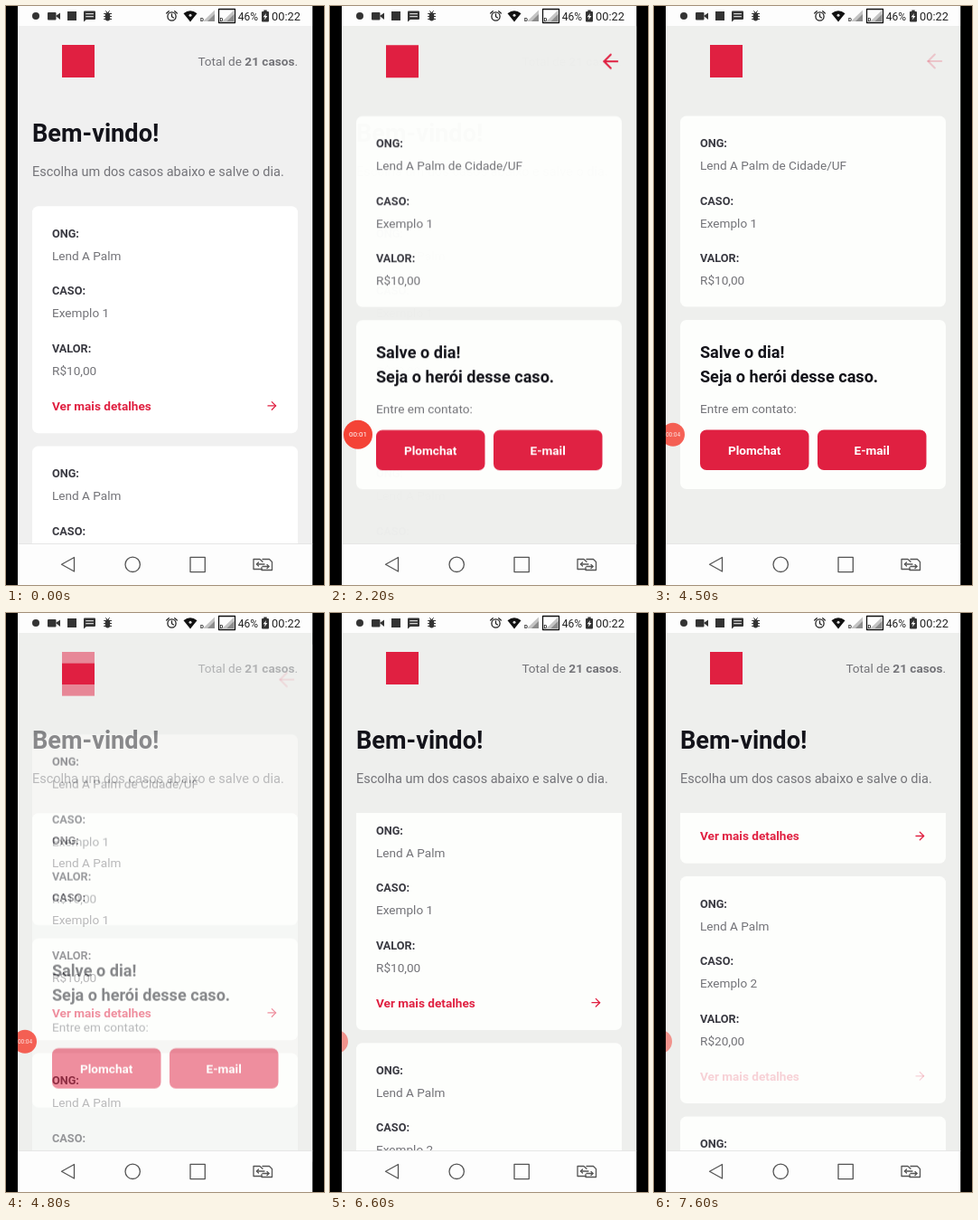
These frames come from a looping animation (352 by 640 pixels, 8 s). An HTML page with a canvas:

```html
<!DOCTYPE html>
<html lang="pt-BR">
<head>
<meta charset="utf-8">
<title>Casos</title>
<style>
  html, body { margin: 0; width: 100%; height: 100%; overflow: hidden; background: #000; }
  canvas { display: block; width: 352px; height: 640px; }
</style>
</head>
<body>
<canvas id="stage" width="352" height="640"></canvas>
<script>
const LOOP = 8000, W = 352, H = 640;
const LEFT = 13, RIGHT = 339.5, TOP = 22, BOTTOM = 594;
const RED = '#e02041', DARK = '#3a3a42', GREY = '#737378', INK = '#13131a';
const ORG = 'Lend A Palm', CARD_STEP = 265.3, CARD_H = 251;

const screen = document.getElementById('stage').getContext('2d');
const layerCanvas = document.createElement('canvas');
layerCanvas.width = W;
layerCanvas.height = H;
const layer = layerCanvas.getContext('2d');
let c = screen;

const clamp = v => Math.max(0, Math.min(1, v));
const ramp = (t, a, b) => clamp((t - a) / (b - a));
const smooth = (t, a, b) => { const p = ramp(t, a, b); return p * p * (3 - 2 * p); };
const mix = (a, b, p) => a + (b - a) * p;
const gray = (from, to, p) => `rgb(${from.map((v, i) => Math.round(mix(v, to[i], p)))})`;

function rect(x, y, w, h, fill) {
  c.fillStyle = fill;
  c.fillRect(x, y, w, h);
}

function rounded(x, y, w, h, r, fill) {
  c.fillStyle = fill;
  c.beginPath();
  c.roundRect(x, y, w, h, r);
  c.fill();
}

function disc(x, y, r, fill) {
  c.fillStyle = fill;
  c.beginPath();
  c.arc(x, y, r, 0, 2 * Math.PI);
  c.fill();
}

function ring(x, y, r) {
  c.beginPath();
  c.arc(x, y, r, 0, 2 * Math.PI);
  c.stroke();
}

function path(points, close) {
  c.beginPath();
  points.forEach(([x, y]) => c.lineTo(x, y));
  if (close) c.closePath();
}

function poly(points, fill) {
  path(points, true);
  c.fillStyle = fill;
  c.fill();
}

function pen(color, width) {
  c.strokeStyle = color;
  c.lineWidth = width;
  c.lineCap = c.lineJoin = 'round';
}

function text(str, x, y, size, color, weight = 400, align = 'left') {
  c.font = `${weight} ${size}px Roboto, sans-serif`;
  c.textAlign = align;
  c.fillStyle = color;
  c.fillText(str, x, y);
  return c.measureText(str).width;
}

function faded(alpha, draw) {
  c.save();
  c.globalAlpha *= alpha;
  draw();
  c.restore();
}

// direction: 1 points right, -1 points left
function arrow(x, y, half, direction, width) {
  const d = half * direction;
  pen(RED, width);
  path([[x - d, y], [x + d, y]]);
  c.stroke();
  path([[x, y - half], [x + d, y], [x, y + half]]);
  c.stroke();
}

function tone(t) {
  const p = ramp(t, 100, 900);
  return {
    page: gray([240, 240, 240], [238, 239, 237], p),
    card: gray([255, 255, 255], [253, 254, 252], p)
  };
}

function header(colors) {
  rect(LEFT, TOP, RIGHT - LEFT, BOTTOM - TOP, colors.page);
  rect(62, 43, 36, 36, RED);
}

function facts(top, rows) {
  rows.forEach(([label, value], i) => {
    const y = top + i * 63.5;
    text(label, 51, y + 34.7, 12.7, DARK, 700);
    text(value, 51, y + 59.6, 13.6, GREY);
  });
}

function caseCard(index, y, colors, linkAlpha) {
  rounded(29, y, 294, CARD_H, 7, colors.card);
  facts(y, [['ONG:', ORG], ['CASO:', `Exemplo ${index}`], ['VALOR:', `R$${index}0,00`]]);
  faded(linkAlpha, () => {
    text('Ver mais detalhes', 51, y + 225.6, 13.6, RED, 700);
    arrow(294.3, y + 220.7, 4.3, 1, 1.3);
  });
}

function listPage(t, colors) {
  header(colors);
  const dot = text('.', 323, 66, 13.6, GREY, 400, 'right');
  const count = text('21 casos', 323 - dot, 66, 13.6, GREY, 700, 'right');
  text('Total de ', 323 - dot - count, 66, 13.6, GREY, 400, 'right');
  text('Bem-vindo!', 29, 149.7, 27.2, INK, 700);
  text('Escolha um dos casos abaixo e salve o dia.', 29, 187.7, 14.5, GREY);

  c.save();
  c.beginPath();
  c.rect(LEFT, 221, RIGHT - LEFT, BOTTOM - 221);
  c.clip();
  const scroll = 195.4 * smooth(t, 6470, 7370);
  const firstLink = t < 3000 ? 1 - 0.8 * ramp(t, 1580, 1700) : 1;
  const secondLink = 1 - 0.8 * ramp(t, 7470, 7590);
  [firstLink, secondLink, 1].forEach((alpha, i) =>
    caseCard(i + 1, 221.2 + i * CARD_STEP - scroll, colors, alpha));
  c.restore();
}

function button(label, x) {
  rounded(x, 468.5, 120.5, 44.5, 7, RED);
  text(label, x + 60.2, 496, 13.6, '#fff', 700, 'center');
}

function detailPage(t, colors) {
  header(colors);
  faded(1 - 0.8 * ramp(t, 4370, 4490), () => arrow(310.8, 61, 7.4, -1, 2.1));
  rounded(29, 121.5, 294, 211, 7, colors.card);
  facts(121.5, [['ONG:', `${ORG} de Cidade/UF`], ['CASO:', 'Exemplo 1'], ['VALOR:', 'R$10,00']]);
  rounded(29, 347, 294, 187, 7, colors.card);
  text('Salve o dia!', 51, 389, 18.1, INK, 700);
  text('Seja o herói desse caso.', 51, 415.6, 18.1, INK, 700);
  text('Entre em contato:', 51, 450.4, 13.6, GREY);
  button('Plomchat', 51);
  button('E-mail', 181);
}

function detailPhase(t) {
  return t < 4000 ? 1 - Math.pow(1 - ramp(t, 1970, 2320), 5) : 1 - ramp(t, 4760, 4910);
}

function drawPages(t) {
  const colors = tone(t), shown = detailPhase(t);
  if (shown < 1) listPage(t, colors);
  if (shown <= 0) return;
  c = layer;
  c.clearRect(0, 0, W, H);
  detailPage(t, colors);
  c = screen;
  const alpha = shown < 0.5 ? shown / 2
    : shown < 0.9 ? mix(0.25, 0.7, (shown - 0.5) / 0.4)
    : mix(0.7, 1, (shown - 0.9) / 0.1);
  faded(alpha, () => c.drawImage(layerCanvas, 0, 46 * (1 - shown)));
}

function recorderBubble(t) {
  const appear = smooth(t, 400, 600);
  if (!appear) return;
  const dock = smooth(t, 2900, 3300);
  const x = 31 - 10 * dock - 14 * smooth(t, 4950, 5400);
  const r = (16 - 3 * dock) * appear;
  const seconds = [1200, 2300, 3350, 4400, 5400].filter(tick => t >= tick).length;
  faded(1 - 0.16 * dock - 0.31 * smooth(t, 5000, 5550), () => {
    disc(x, 473.7, r, '#f44336');
    faded(1 - ramp(t, 5250, 5550), () =>
      text(`00:0${seconds}`, x, 473.7 + r * 0.17, r / 2, '#fff', 400, 'center'));
  });
}

function signal(x) {
  poly([[x, 17], [x + 13, 17], [x + 13, 4.5]], '#c4c4c4');
  poly([[x + 5, 17], [x + 13, 17], [x + 13, 9]], '#8c8c8c');
  text('D', x - 3, 17, 6, '#222', 700);
}

function statusBar() {
  const ink = '#333';
  rect(LEFT, 0, RIGHT - LEFT, TOP, '#fdfdfd');
  disc(33, 11, 4, ink);
  rounded(46, 7, 9.5, 8.5, 1, ink);
  poly([[55, 11], [60, 7.5], [60, 15]], ink);
  rect(68, 6, 10, 10, ink);

  rounded(86, 5.5, 13, 9.5, 1, ink);
  poly([[86, 13], [90, 14], [86, 17.5]], ink);
  pen('#fdfdfd', 1);
  path([[88.5, 8.7], [96.5, 8.7]]);
  c.stroke();
  path([[88.5, 11.7], [96.5, 11.7]]);
  c.stroke();

  rounded(109.8, 7, 5.4, 9.5, 2.7, ink);
  pen(ink, 1);
  [8.5, 11.5, 14.5].forEach(y => { path([[108.3, y], [116.7, y]]); c.stroke(); });
  path([[110.5, 5.5], [112.5, 7.5], [114.5, 5.5]]);
  c.stroke();

  pen('#222', 1.3);
  ring(183.5, 11.5, 4.6);
  path([[183.5, 8.8], [183.5, 11.8], [185.5, 13]]);
  c.stroke();
  path([[177.7, 8], [180.3, 5.7]]);
  c.stroke();
  path([[186.7, 5.7], [189.3, 8]]);
  c.stroke();

  c.fillStyle = '#111';
  c.beginPath();
  c.moveTo(204, 17.5);
  c.lineTo(196.5, 8.2);
  c.quadraticCurveTo(204, 2.5, 211.5, 8.2);
  c.fill();
  disc(204, 10.3, 1.5, '#ddd');

  signal(218);
  pen('#111', 1.3);
  c.strokeRect(235.5, 3.5, 18, 15);
  signal(239.5);
  text('46%', 256.7, 15.5, 12, '#222');
  rounded(283, 6, 8, 11.5, 1, '#333');
  rect(285.3, 4.5, 3.4, 2, '#333');
  poly([[288, 8], [284.7, 12.3], [286.8, 12.3], [286, 15.5], [289.4, 11], [287.3, 11]], '#fff');
  text('00:22', 294, 15.6, 12.8, '#222');
}

function navBar() {
  rect(LEFT, BOTTOM, RIGHT - LEFT, H - BOTTOM, '#fdfdfd');
  rect(LEFT, BOTTOM, RIGHT - LEFT, 1, '#e6e6e6');
  pen('#555', 1.3);
  path([[61.5, 617.3], [75.5, 609.5], [75.5, 625]], true);
  c.stroke();
  ring(140.2, 617.3, 8.2);
  c.strokeRect(204, 609.3, 16.3, 16.3);
  path([[283, 622.5], [274, 622.5], [274, 611.5], [281, 611.5], [284, 614.3]]);
  c.stroke();
  path([[284, 611.5], [291.5, 611.5], [294.5, 614.5], [294.5, 623.5], [283, 623.5], [283, 620.5]]);
  c.stroke();
  path([[277.5, 617], [286, 617]]);
  c.stroke();
  path([[279.5, 615], [277.5, 617], [279.5, 619]]);
  c.stroke();
  path([[284, 619.5], [291, 619.5]]);
  c.stroke();
  path([[289, 617.5], [291, 619.5], [289, 621.5]]);
  c.stroke();
}

function render(t) {
  rect(0, 0, W, H, '#000');
  drawPages(t);
  recorderBubble(t);
  statusBar();
  navBar();
  rect(0, 0, LEFT, H, '#000');
  rect(RIGHT, 0, W - RIGHT, H, '#000');
}

const start = performance.now();
function tick() {
  render((performance.now() - start) % LOOP);
  requestAnimationFrame(tick);
}
tick();
</script>
</body>
</html>
```
